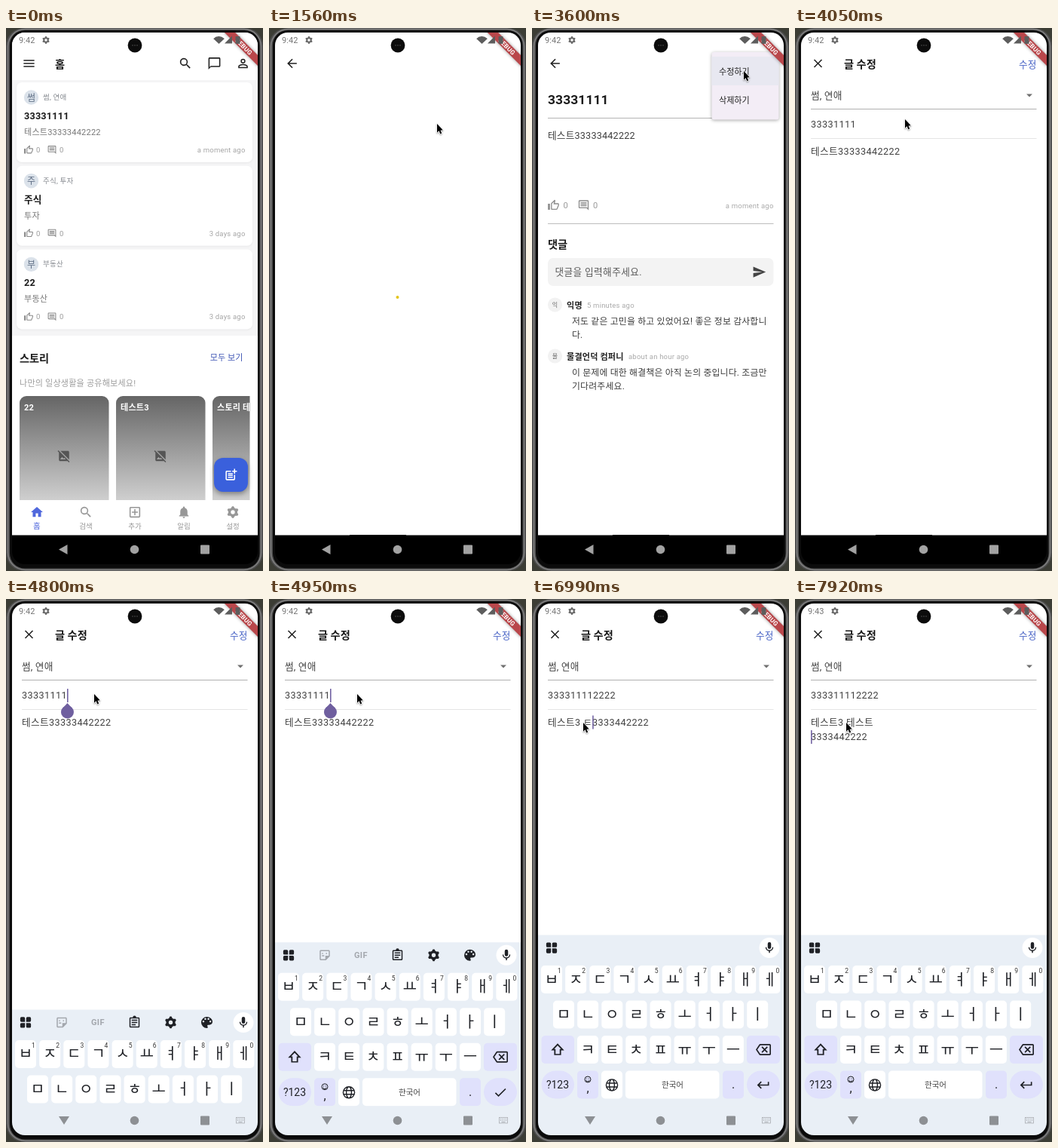
These frames come from a looping animation (341x720 px, 8 s). An HTML page with a canvas:

```html
<!DOCTYPE html>
<html lang="ko">
<head>
<meta charset="utf-8">
<title>Community app</title>
<style>
html, body { margin: 0; width: 100%; height: 100%; overflow: hidden; background: #111; }
canvas { display: block; width: 341px; height: 720px; }
</style>
</head>
<body>
<canvas id="stage"></canvas>
<script>
const W = 341, H = 720, LOOP = 8000;
const FONT = "Roboto, 'Noto Sans CJK KR', 'Noto Sans CJK', sans-serif";
const canvas = document.getElementById('stage');
const c = canvas.getContext('2d');
const dpr = window.devicePixelRatio || 1;
canvas.width = W * dpr;
canvas.height = H * dpr;

// Icons on a 24 unit grid
const icons = {
  menu: 'M3 18h18v-2H3zM3 13h18v-2H3zM3 6v2h18V6z',
  search: 'M15.5 14h-.8l-.3-.3A6.5 6.5 0 1 0 13.7 14.4l.3.3v.8l5 5 1.5-1.5zM9.5 14a4.5 4.5 0 1 1 0-9 4.5 4.5 0 0 1 0 9z',
  chat: 'M20 2H4c-1.1 0-2 .9-2 2v18l4-4h14c1.1 0 2-.9 2-2V4c0-1.1-.9-2-2-2zM20 16H6l-2 2V4h16z',
  person: 'M12 5.9a2.1 2.1 0 1 1 0 4.2 2.1 2.1 0 0 1 0-4.2M12 14.9c3 0 6.1 1.5 6.1 2.1v1.1H5.9V17c0-.6 3.1-2.1 6.1-2.1M12 4a4 4 0 1 0 0 8 4 4 0 0 0 0-8zM12 13c-2.7 0-8 1.3-8 4v3h16v-3c0-2.7-5.3-4-8-4z',
  back: 'M20 11H7.8l5.6-5.6L12 4l-8 8 8 8 1.4-1.4L7.8 13H20z',
  close: 'M19 6.4L17.6 5 12 10.6 6.4 5 5 6.4 10.6 12 5 17.6 6.4 19 12 13.4 17.6 19 19 17.6 13.4 12z',
  home: 'M10 20v-6h4v6h5v-8h3L12 3 2 12h3v8z',
  add: 'M19 3H5c-1.1 0-2 .9-2 2v14c0 1.1.9 2 2 2h14c1.1 0 2-.9 2-2V5c0-1.1-.9-2-2-2zM19 19H5V5h14zM11 17h2v-4h4v-2h-4V7h-2v4H7v2h4z',
  bell: 'M12 22c1.1 0 2-.9 2-2h-4c0 1.1.9 2 2 2zM18 16v-5c0-3.1-1.6-5.6-4.5-6.3V4a1.5 1.5 0 0 0-3 0v.7C7.6 5.4 6 7.9 6 11v5l-2 2v1h16v-1z',
  thumb: 'M9 21h9c.8 0 1.5-.5 1.8-1.2l3-7.1c.1-.2.2-.4.2-.7v-2c0-1.1-.9-2-2-2h-6.3l1-4.6v-.3c0-.4-.2-.8-.4-1.1L14.2 1 7.6 7.6C7.2 8 7 8.5 7 9v10c0 1.1.9 2 2 2zM9 9l4.3-4.3L12 10h9v2l-3 7H9zM1 9h4v12H1z',
  comment: 'M22 4c0-1.1-.9-2-2-2H4c-1.1 0-2 .9-2 2v12c0 1.1.9 2 2 2h14l4 4zM20 4v13.2L18.8 16H4V4zM6 12h12v2H6zM6 9h12v2H6zM6 6h12v2H6z',
  send: 'M2 21l21-9L2 3v7l15 2-15 2z',
  noImage: 'M21.9 21.9L2.1 2.1.7 3.5 3 5.8V19c0 1.1.9 2 2 2h13.2l2.3 2.3zM5 18l3.5-4.5 2.5 3 1.2-1.5 3 3zM21 18.2L5.8 3H19c1.1 0 2 .9 2 2z',
  post: 'M17 19H5V7h7V5H5c-1.1 0-2 .9-2 2v12c0 1.1.9 2 2 2h12c1.1 0 2-.9 2-2v-7h-2zM19 2h-2v3h-3v2h3v3h2V7h3V5h-3zM7 9h8v2H7zM7 12h8v2H7zM7 15h8v2H7z',
  drop: 'M7 10l5 5 5-5z',
  more: 'M12 4a2 2 0 1 0 0 4 2 2 0 0 0 0-4zM12 10a2 2 0 1 0 0 4 2 2 0 0 0 0-4zM12 16a2 2 0 1 0 0 4 2 2 0 0 0 0-4z',
  shift: 'M12 3L2.5 13H7v7h10v-7h4.5zM12 5.9L17 11.2h-2v7H9v-7H7z',
  erase: 'M22 3H7c-.7 0-1.2.4-1.6.9L0 12l5.4 8.1c.4.5.9.9 1.6.9h15c1.1 0 2-.9 2-2V5c0-1.1-.9-2-2-2zM22 19H7.1L2.4 12l4.7-7H22zM10.4 17l3.6-3.6 3.6 3.6 1.4-1.4-3.6-3.6L19 8.4 17.6 7 14 10.6 10.4 7 9 8.4l3.6 3.6L9 15.6z',
  mic: 'M12 14a3 3 0 0 0 3-3V5a3 3 0 0 0-6 0v6a3 3 0 0 0 3 3zM17 11a5 5 0 0 1-10 0H5c0 3.5 2.6 6.4 6 6.9V21h2v-3.1c3.4-.5 6-3.4 6-6.9z',
  palette: 'M12 3a9 9 0 0 0 0 18c.8 0 1.5-.7 1.5-1.5 0-.8-.8-1.2-.8-2s.7-1.5 1.5-1.5H16c2.8 0 5-2.2 5-5 0-4.4-4-8-9-8zM6.5 9a1.5 1.5 0 1 0 .1 0zM9.5 5a1.5 1.5 0 1 0 .1 0zM14.5 5a1.5 1.5 0 1 0 .1 0zM17.5 9a1.5 1.5 0 1 0 .1 0z',
  clip: 'M19 3h-4a3 3 0 0 0-6 0H5c-1.1 0-2 .9-2 2v14c0 1.1.9 2 2 2h14c1.1 0 2-.9 2-2V5c0-1.1-.9-2-2-2zM19 19H5V5h14zM7 7h10v2H7zM7 11h10v2H7zM7 15h7v2H7z',
  sticker: 'M5 3h14c1.1 0 2 .9 2 2v9l-7 7H5c-1.1 0-2-.9-2-2V5c0-1.1.9-2 2-2zM5 5v14h8v-6h6V5zM7 8h2v2H7zM14 8h2v2h-2zM7 12h4v2H7z',
  check: 'M9 16.2L4.8 12l-1.4 1.4L9 19 21 7l-1.4-1.4z',
  enter: 'M19 7v4H5.8l3.6-3.6L8 6l-6 6 6 6 1.4-1.4L5.8 13H21V7z',
  apps: 'M3 5a2 2 0 0 1 2-2h4a2 2 0 0 1 2 2v6H5a2 2 0 0 1-2-2zM13 5a2 2 0 0 1 2-2h4a2 2 0 0 1 2 2v4a2 2 0 0 1-2 2h-6zM3 15a2 2 0 0 1 2-2h6v6a2 2 0 0 1-2 2H5a2 2 0 0 1-2-2zM13 13h6a2 2 0 0 1 2 2v4a2 2 0 0 1-2 2h-4a2 2 0 0 1-2-2z'
};
const paths = Object.fromEntries(Object.entries(icons).map(([k, d]) => [k, new Path2D(d)]));

paths.gear = new Path2D();
for (let i = 0; i < 24; i++) {
  const a = (i - .5) * Math.PI / 12, r = i % 4 < 2 ? 10 : 7.6;
  paths.gear.lineTo(12 + r * Math.sin(a), 12 - r * Math.cos(a));
}
paths.gear.closePath();
paths.gear.moveTo(15.4, 12);
paths.gear.arc(12, 12, 3.4, 0, 7);

function icon(name, x, y, size, color) {
  c.save();
  c.translate(x - size / 2, y - size / 2);
  c.scale(size / 24, size / 24);
  c.fillStyle = color;
  c.fill(paths[name], 'evenodd');
  c.restore();
}
function text(s, x, y, size, color, { weight = 400, gap = .2, align = 'left' } = {}) {
  c.font = `${weight} ${size}px ${FONT}`;
  c.letterSpacing = gap + 'px';
  c.textAlign = align;
  c.fillStyle = color;
  c.fillText(s, x, y);
}
function rect(x, y, w, h, color, r = 0) {
  c.fillStyle = color;
  c.beginPath();
  c.roundRect(x, y, w, h, r);
  c.fill();
}
function disc(x, y, r, color) {
  c.fillStyle = color;
  c.beginPath();
  c.arc(x, y, r, 0, 7);
  c.fill();
}
function poly(points, color) {
  c.fillStyle = color;
  c.beginPath();
  points.forEach(([x, y]) => c.lineTo(x, y));
  c.closePath();
  c.fill();
}
function shadow(color, blur, dy) {
  c.shadowColor = color;
  c.shadowBlur = blur * dpr;
  c.shadowOffsetY = dy * dpr;
}
const progress = (t, a, b) => Math.min(1, Math.max(0, (t - a) / (b - a)));
const easeOut = p => 1 - (1 - p) ** 3;
const smooth = p => p * p * (3 - 2 * p);
const BIG = 12.65, MID = 11.07, SMALL = 9.5, HEAD = 14.2;

function postCard(i, mark, tags, title, body, ago, t) {
  const y = 72 + i * 110.7;
  c.save();
  shadow('rgba(0,0,0,.06)', 3, 1);
  rect(14, y, 313, 106, '#fff', 7);
  c.restore();
  const ripple = progress(t, 1210, 1400);
  if (i === 0 && ripple > 0) {
    c.save();
    c.beginPath();
    c.roundRect(14, y, 313, 106, 7);
    c.clip();
    disc(223, 127, 30 + 220 * ripple, 'rgba(0,0,0,.07)');
    c.restore();
  }
  disc(33.5, y + 20, 9.7, '#dbe2ea');
  text(mark, 33.5, y + 24.5, 12, '#5f6f85', { align: 'center', gap: 0 });
  text(tags, 49, y + 23, SMALL, '#85898f');
  text(title, 24, y + 49, BIG, '#1c1c1c', { weight: 700 });
  text(body, 24, y + 70, MID, '#777');
  icon('thumb', 30, y + 89.5, 13, '#8a8a8a');
  text('0', 40, y + 93, SMALL, '#999');
  icon('comment', 61, y + 89.5, 13, '#8a8a8a');
  text('0', 71, y + 93, SMALL, '#999');
  text(ago, 317.5, y + 93, SMALL, '#a5a5a5', { align: 'right' });
}

function storyCard(x, title) {
  const g = c.createLinearGradient(0, 488, 0, 626);
  g.addColorStop(0, '#656565');
  g.addColorStop(1, '#cfcfcf');
  rect(x, 488, 118.5, 160, g, 9);
  text(title, x + 6, 507, MID, '#fff', { weight: 700 });
  icon('noImage', x + 59, 567.5, 18, '#555');
}

function homePage(t) {
  rect(8, 6, 326, 667, '#f5f5f6');
  rect(8, 6, 326, 63, '#fff');
  icon('menu', 30.5, 47, 19, '#222');
  text('홈', 65, 52.5, HEAD, '#161616', { weight: 700, gap: 0 });
  icon('search', 238, 47, 19, '#222');
  icon('chat', 276.5, 47, 19, '#222');
  icon('person', 314.5, 47, 19, '#222');
  postCard(0, '썸', '썸, 연애', '33331111', '테스트33333442222', 'a moment ago', t);
  postCard(1, '주', '주식, 투자', '주식', '투자', '3 days ago', t);
  postCard(2, '부', '부동산', '22', '부동산', '3 days ago', t);

  rect(8, 408, 326, 218, '#fff');
  text('스토리', 18, 443, HEAD, '#1c1c1c', { weight: 700, gap: 0 });
  text('모두 보기', 314.5, 441, MID, '#3f56b5', { align: 'right', gap: .08 });
  text('나만의 일상생활을 공유해보세요!', 18, 475, MID, '#9c9c9c');
  c.save();
  c.beginPath();
  c.rect(8, 480, 315.5, 146);
  c.clip();
  ['22', '테스트3', '스토리 테스트'].forEach((s, i) => storyCard(18 + 128 * i, s));
  c.restore();
  c.save();
  shadow('rgba(0,0,0,.35)', 6, 3);
  rect(276, 570, 45, 45, '#3a60dc', 12);
  c.restore();
  icon('post', 298.5, 592.5, 19, '#fff');

  rect(8, 626, 326, 47, '#fff');
  const tabs = [['home', '홈'], ['search', '검색'], ['add', '추가'], ['bell', '알림'], ['gear', '설정']];
  tabs.forEach(([name, label], i) => {
    const x = 41 + 65 * i, color = i ? '#979797' : '#5068dc';
    icon(name, x, 642, 19, color);
    text(label, x, 664, i ? SMALL : 10.5, color, { align: 'center', gap: .1 });
  });
}

function blankPage() {
  rect(8, 6, 326, 667, '#fff');
  rect(107, 672, 75, 1, '#111');
}

function commentRow(y, mark, name, nameEnd, ago, lines) {
  disc(30.5, y, 9.6, '#f2f2f2');
  text(mark, 30.5, y + 3, 8, '#666', { align: 'center', gap: 0 });
  text(name, 46, y + 5, MID, '#222', { weight: 700 });
  text(ago, nameEnd, y + 4, SMALL, '#aaa');
  lines.forEach((s, i) => text(s, 53, y + 26 + 18 * i, 11.86, '#3d3d3d'));
}

function detailPage(t) {
  blankPage();
  icon('back', 30.5, 47, 19, '#222');
  if (t < 1680) {
    const p = progress(t, 1530, 1680);
    if (p > 0) disc(170.5, 357, 1 + 5 * p, '#e3c51c');
    return;
  }
  icon('more', 314, 47, 19, '#222');
  const press = progress(t, 2840, 2920) * (1 - progress(t, 3000, 3250));
  if (press) disc(314, 47, 16, `rgba(0,0,0,${.09 * press})`);
  text('33331111', 21, 100.5, 17.4, '#1c1c1c', { weight: 700, gap: .1 });
  rect(21, 119, 299.5, 1, '#b4b4b4');
  text('테스트33333442222', 21, 147, BIG, '#3d3d3d');
  icon('thumb', 28.5, 235, 16, '#8c8c8c');
  text('0', 41.5, 239, MID, '#999');
  icon('comment', 68.5, 235, 16, '#8c8c8c');
  text('0', 81, 239, MID, '#999');
  text('a moment ago', 320.5, 239, SMALL, '#aaa', { align: 'right' });
  rect(21, 259, 299.5, 1, '#bdbdbd');
  text('댓글', 21, 292, HEAD, '#1c1c1c', { weight: 700, gap: 0 });
  rect(21, 305, 299.5, 37, '#f3f3f3', 7);
  text('댓글을 입력해주세요.', 30.5, 328, BIG, '#5a5a5a', { gap: .39 });
  icon('send', 301.5, 323.5, 19, '#444');
  commentRow(367, '익', '익명', 73, '5 minutes ago', ['저도 같은 고민을 하고 있었어요! 좋은 정보 감사합니', '다.']);
  commentRow(435, '물', '물결언덕 컴퍼니', 128, 'about an hour ago', ['이 문제에 대한 해결책은 아직 논의 중입니다. 조금만', '기다려주세요.']);
}

function popupMenu(t) {
  const open = easeOut(progress(t, 2920, 3200)), shown = open * (1 - progress(t, 3690, 3790));
  if (!shown) return;
  const width = 89 * (.4 + .6 * open);
  c.save();
  c.globalAlpha = shown;
  c.save();
  shadow('rgba(0,0,0,.35)', 4, 1);
  rect(327.5 - width, 32, width, 89.5 * open, '#f3edf6', 3);
  c.restore();
  if (t > 3180) rect(238.5, 38, 89, 38, '#e8e8f1');
  c.globalAlpha = shown * progress(t, 2990, 3120);
  text('수정하기', 248, 61.5, MID, '#222', { gap: 0 });
  text('삭제하기', 248, 99.5, MID, '#222', { gap: 0 });
  c.restore();
}

const TITLE_KEYS = [5450, 5520, 5580, 5640];
const BODY_STEPS = ['', ' ', ' ㅌ', ' 테', ' 텟', ' 테스', ' 테슽', ' 테스트', ' 테스트\n'];
const FOCUS_TITLE = 4700, FOCUS_BODY = 6480;

function caret(prefix, y, t, lastEdit, handle) {
  c.font = `400 ${BIG}px ${FONT}`;
  c.letterSpacing = '.39px';
  const x = 21.5 + c.measureText(prefix).width;
  if ((t - lastEdit) % 1000 < 500) rect(x - .4, y - 13, 1.5, 18, '#6a5a9e');
  if (!handle) return;
  disc(x, y + 18, 8.5, '#6f5f9f');
  poly([[x, y + 6], [x + 6.5, y + 13], [x - 6.5, y + 13]], '#6f5f9f');
}

function editPage(t) {
  const field = { gap: .39 }, ink = '#404040';
  blankPage();
  icon('close', 30.5, 47, 19, '#222');
  text('글 수정', 65, 52.5, HEAD, '#161616', { weight: 700, gap: 0 });
  text('수정', 320.5, 52.5, BIG, '#4560c4', { weight: 500, align: 'right', gap: .1 });
  text('썸, 연애', 21, 93.5, BIG, ink);
  icon('drop', 311, 89, 19, '#707070');
  rect(21, 107, 299.5, 1, '#b0b0b0');
  rect(21, 146, 299.5, 1, '#e5e5e5');

  const typed = TITLE_KEYS.filter(k => t >= k);
  const title = '33331111' + '2'.repeat(typed.length);
  text(title, 21, 132, BIG, ink, field);
  const step = t < 6900 ? 0 : Math.min(8, 1 + Math.floor((t - 6900) / 90));
  const before = '테스트3' + BODY_STEPS[step];
  const lines = (before + '3333442222').split('\n');
  lines.forEach((s, i) => text(s, 21, 167.5 + 19.5 * i, BIG, ink, field));

  if (t >= FOCUS_BODY) {
    const edit = step ? 6900 + (step - 1) * 90 : FOCUS_BODY;
    caret(before.split('\n').pop(), step === 8 ? 187 : 167.5, t, edit, !step);
  } else if (t >= FOCUS_TITLE) {
    caret(title, 132, t, typed.length ? typed[typed.length - 1] : FOCUS_TITLE, !typed.length);
  }
}

function key(x, y, w, color = '#fff', r = 5) { rect(x, y, w, 37, color, r); }

function keyboard(t) {
  const p = progress(t, FOCUS_TITLE, 5080);
  if (!p) return;
  const ink = '#1f2126', tint = '#e0e1fc', center = { align: 'center', gap: 0 };
  c.save();
  c.beginPath();
  c.rect(8, 300, 326, 373);
  c.clip();
  c.translate(0, 250 * (1 - easeOut(p)));
  rect(8, 445.5, 326, 300, '#e9eff6');
  icon('apps', 26, 462.5, 19, ink);
  if (t < 6960) {
    icon('sticker', 74, 462.5, 18, '#a3a7ad');
    text('GIF', 122, 466.5, 11, '#a3a7ad', { weight: 700, align: 'center', gap: .5 });
    icon('clip', 170.5, 462.5, 18, ink);
    icon('gear', 218.5, 462.5, 19, ink);
    icon('palette', 266.5, 462.5, 20, ink);
  }
  disc(315, 462.5, 13.5, '#fff');
  icon('mic', 315, 462.5, 18, ink);

  [['ㅂㅈㄷㄱㅅㅛㅕㅑㅐㅔ', 26, 486], ['ㅁㄴㅇㄹㅎㅗㅓㅏㅣ', 42, 532.5], ['ㅋㅌㅊㅍㅠㅜㅡ', 74, 579]].forEach(([row, x0, y], r) => {
    [...row].forEach((s, i) => {
      const x = x0 + 32.15 * i;
      key(x - 14, y, 28);
      text(s, x, y + 25.5, 20, ink, center);
      if (r === 0) text((i + 1) % 10, x + 10.5, y + 10, 8.5, '#333', center);
    });
  });
  key(12.5, 579, 43.5, tint);
  icon('shift', 34, 597.5, 22, ink);
  key(285, 579, 44, tint);
  icon('erase', 307, 597.5, 20, ink);

  key(12.5, 625.5, 43.5, tint, 18.5);
  text('?123', 34, 649, 14, ink, center);
  key(60, 625.5, 28, tint);
  c.strokeStyle = ink;
  c.lineWidth = 1;
  c.beginPath();
  c.arc(74, 637, 4, 0, 7);
  c.moveTo(76, 638);
  c.arc(74, 638, 2, 0, Math.PI);
  c.stroke();
  disc(72.6, 636, .6, ink);
  disc(75.4, 636, .6, ink);
  text(',', 74, 654, 16, ink, center);
  key(92, 625.5, 28);
  c.lineWidth = 1.4;
  c.beginPath();
  c.arc(106, 644.5, 7.6, 0, 7);
  c.moveTo(109.4, 644.5);
  c.ellipse(106, 644.5, 3.4, 7.6, 0, 0, 7);
  [-2.5, 2.5].forEach(d => { c.moveTo(99, 644.5 + d); c.lineTo(113, 644.5 + d); });
  c.stroke();
  key(124, 625.5, 124.5);
  text('한국어', 186.5, 648, 10.5, '#444', center);
  key(253, 625.5, 28, tint);
  text('.', 267, 649, 16, ink, center);
  key(285, 625.5, 44, tint, 18.5);
  icon(t < FOCUS_BODY ? 'check' : 'enter', 307, 644.5, 20, ink);
  c.restore();
}

function systemNav(t) {
  const light = t >= FOCUS_TITLE + 40;
  const color = light ? '#8d9094' : '#a2a2a2';
  rect(8, 672.5, 326, 40, light ? '#e9eff6' : '#000');
  if (light) {
    poly([[70, 686], [84, 686], [77, 697]], color);
    c.strokeStyle = '#a8abb0';
    c.lineWidth = .8;
    c.strokeRect(305.5, 687.5, 11, 7.5);
    for (let i = 0; i < 8; i++) rect(307 + 2.3 * (i % 4), 689 + 2 * Math.floor(i / 4), 1, 1, '#9a9da2');
    rect(308.5, 693, 5, .8, '#9a9da2');
  } else {
    poly([[70, 691.5], [81.5, 685], [81.5, 698]], color);
  }
  disc(170.5, 691.5, 5.8, color);
  rect(258, 685.5, 12, 12, color, 1);
}

function debugBanner() {
  c.save();
  c.translate(315.5, 24.5);
  c.rotate(Math.PI / 4);
  shadow('rgba(0,0,0,.4)', 4, 0);
  rect(-40, -5, 80, 10, '#b9474b');
  c.shadowColor = 'transparent';
  text('DEBUG', 0, 3, 8.4, '#fff', { weight: 700, align: 'center', gap: .1 });
  c.restore();
}

function statusBar(t) {
  debugBanner();
  const ink = '#5d5d5d';
  text(t < FOCUS_BODY ? '9:42' : '9:43', 17, 20, 11, '#757575', { gap: .1 });
  icon('gear', 53, 16, 12, '#6c6c6c');
  c.fillStyle = ink;
  c.beginPath();
  c.moveTo(282.5, 21);
  c.arc(282.5, 21, 10, -Math.PI * .76, -Math.PI * .24);
  c.fill();
  poly([[290, 20.5], [300, 20.5], [300, 10.5]], ink);
  rect(304.5, 11, 6, 10, ink, 1);
  disc(171, 23, 9.4, '#0c0c0c');
  [-3, 0, 3].forEach(d => disc(171 + d, 23, .9, '#3a3a3a'));
}

// Pages fade in while growing to full size
function enter(p, draw, t) {
  if (!p) return;
  const s = .88 + .12 * easeOut(p);
  c.save();
  c.globalAlpha = Math.min(1, p * 1.6);
  c.translate(171, 340);
  c.scale(s, s);
  c.translate(-171, -340);
  draw(t);
  c.restore();
}

const track = [
  [450, 345, 30], [780, 264, 97], [930, 264, 97], [1080, 223, 127], [2070, 223, 127],
  [2750, 313, 45], [2930, 313, 45], [3290, 281, 57], [3720, 281, 57], [4050, 146, 121],
  [4260, 123, 134], [4300, 123, 134], [4470, 117, 126], [5430, 117, 126], [5740, 76, 163],
  [5800, 76, 163], [6080, 68, 164], [LOOP, 68, 164]
];

function pointer(t) {
  if (t < track[0][0]) return;
  const i = Math.max(1, track.findIndex(k => k[0] >= t));
  const [t0, x0, y0] = track[i - 1], [t1, x1, y1] = track[i];
  const p = smooth(progress(t, t0, t1));
  c.save();
  c.translate(x0 + (x1 - x0) * p, y0 + (y1 - y0) * p);
  c.scale(.86, .9);
  c.beginPath();
  [[0, 0], [0, 13], [3, 10.3], [5, 15], [7.2, 14], [5.2, 9.6], [9, 9.2]].forEach(([x, y]) => c.lineTo(x, y));
  c.closePath();
  c.lineWidth = 1.6;
  c.lineJoin = 'round';
  c.strokeStyle = '#fff';
  shadow('rgba(0,0,0,.4)', 2, 1);
  c.stroke();
  c.shadowColor = 'transparent';
  c.fillStyle = '#000';
  c.fill();
  c.restore();
}

function phoneBody() {
  rect(0, 0, W, H, '#3c3d35');
  rect(0, 0, W, H, '#4e4e4e', 24);
  c.strokeStyle = '#808080';
  c.lineWidth = 1.5;
  c.beginPath();
  c.roundRect(2.5, 1.5, 336, 717, 23);
  c.stroke();
  rect(5, 3, 331.5, 713.5, '#0b0b0b', 20);
}

function draw(t) {
  c.setTransform(dpr, 0, 0, dpr, 0, 0);
  phoneBody();
  c.save();
  c.beginPath();
  c.roundRect(8, 6, 326, 705, 17);
  c.clip();
  const toDetail = progress(t, 1300, 1530), toEdit = progress(t, 3690, 3950);
  if (toDetail < 1) homePage(t);
  if (toEdit < 1) {
    enter(toDetail, detailPage, t);
    popupMenu(t);
  }
  enter(toEdit, editPage, t);
  keyboard(t);
  systemNav(t);
  statusBar(t);
  c.restore();
  pointer(t);
}

const start = performance.now();
function frame() {
  draw((performance.now() - start) % LOOP);
  requestAnimationFrame(frame);
}
frame();
</script>
</body>
</html>
```
